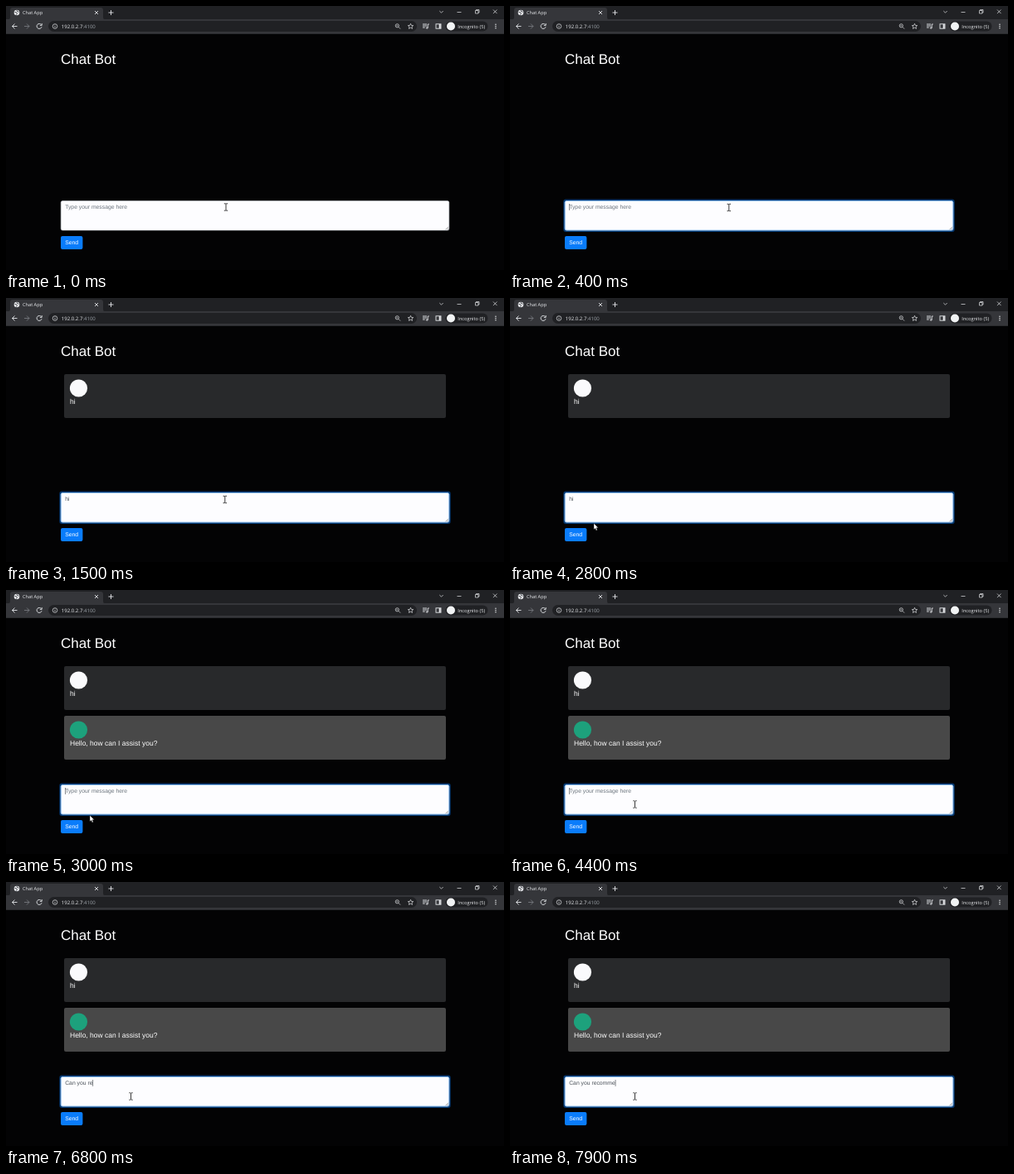
Recreate the animation shown at these times as an HTML page. Size 600x319 px, loop 8 s.

```html
<!DOCTYPE html>
<html lang="en">
<head>
<meta charset="utf-8">
<title>Chat App</title>
<style>
  html, body { margin: 0; width: 100%; height: 100%; overflow: hidden; background: #030304; }
  svg { display: block; width: 600px; height: 319px; }
  text { font-family: "Liberation Sans", Arial, sans-serif; text-rendering: geometricPrecision; white-space: pre; }
  .ui text { font-family: "Open Sans", "Noto Sans", sans-serif; fill: #e8eaed; }
  .icon { fill: none; stroke: #e4e6e9; stroke-width: .9; }
  .small { font-size: 6.8px; }
  .body { font-size: 8.5px; fill: #fff; }
</style>
</head>
<body>
<svg viewBox="0 0 600 319">
  <rect width="600" height="319" fill="#030304"/>

  <g class="ui">
    <rect width="600" height="17" fill="#202124"/>
    <path d="M2 16.5q3 0 3-3V5q0-3 3-3H114q3 0 3 3v8.500q0 3 3 3z" fill="#35363a"/>
    <rect y="16" width="600" height="17" fill="#35363a"/>
    <rect y="33" width="600" height=".6" fill="#47484b"/>
    <circle cx="13" cy="8" r="3.300" fill="#e8eaed"/>
    <path d="M10.500 7.200l2 .6 .8 1.600-1 1.300M13 5l.5 1.500 2 .7" fill="none" stroke="#35363a" stroke-width=".9"/>
    <text x="20" y="10.300" font-size="5.650">Chat App</text>
    <g class="icon">
      <path d="M107 6l4 4m0-4l-4 4M123.500 8h6m-3-3v6"/>
      <path d="M522.300 6l2.200 2.200L526.700 6" stroke-width=".7"/>
      <path d="M543.500 7.500h5M565.500 5.500h3.500v3.500h-3.500zM566.500 5.500v-1h3.500v3.500h-1M587 4.500l4.600 4.600m0-4.600l-4.600 4.600" stroke-width=".7"/>
      <path d="M13.500 24.500H7.500m3-3l-3 3 3 3"/>
      <path d="M22 24.500h6m-3-3l3 3-3 3" stroke="#77797d"/>
      <path d="M42.600 22.800a3 3 0 1 0 .4 2.400M43.200 21v2.400h-2.400"/>
    </g>
    <rect x="51" y="18" width="444" height="13" rx="6.500" fill="#202124"/>
    <g class="icon" stroke-width=".7">
      <circle cx="59" cy="24.500" r="2.800" stroke-width=".7"/>
      <path d="M59 24v2M59 22.700v.6" stroke-width=".7"/>
      <circle cx="471.300" cy="23.800" r="2.100" stroke-width=".7"/>
      <path d="M472.900 25.400l2.200 2.200M470.300 23.800h2" stroke-width=".7"/>
      <path d="M487.500 21.300l.9 2.100 2.300.2-1.700 1.500.5 2.300-2-1.200-2 1.200.5-2.300-1.700-1.500 2.300-.2z" stroke-width=".7"/>
      <path d="M502 22h5M502 24h5M502 26h2.800M508.200 26.500v-4.500h1.600"/>
      <circle cx="507.200" cy="26.500" r=".8"/>
      <rect x="518" y="21.800" width="6" height="5.400"/>
      <path d="M522.700 22v5" stroke-width="2"/>
    </g>
    <text x="66.800" y="26.800" font-size="6.050">192.0.2.7<tspan fill="#9aa0a6">:4100</tspan></text>
    <rect x="529.500" y="18.500" width="51" height="12" rx="6" fill="#202124"/>
    <circle cx="536" cy="24.500" r="5" fill="#f1f3f4"/>
    <text x="544.300" y="26.500" font-size="5.700">Incognito (5)</text>
    <g fill="#e8eaed">
      <circle cx="590" cy="22.300" r=".75"/><circle cx="590" cy="24.500" r=".75"/><circle cx="590" cy="26.700" r=".75"/>
    </g>
  </g>

  <text x="66" y="69.700" font-size="17" fill="#fff">Chat Bot</text>

  <g id="question">
    <rect x="70" y="92" width="460" height="53" rx="2" fill="#28292b"/>
    <circle cx="87.500" cy="109" r="10.600" fill="#fafafc"/>
    <text class="body" x="77" y="127.800">hi</text>
  </g>
  <g id="answer">
    <rect x="70" y="152" width="460" height="53" rx="2" fill="#484848"/>
    <circle cx="87.500" cy="169" r="10.600" fill="#1da17c"/>
    <text class="body" x="77" y="187.800">Hello, how can I assist you?</text>
  </g>

  <rect id="ring" x="64.300" y="233.600" width="471.400" height="39.300" rx="3" fill="#03376f"/>
  <rect x="66.200" y="235.500" width="467.600" height="35.500" rx="2" fill="#fdfdff" stroke="#ced4da" stroke-width=".6"/>
  <rect id="edge" x="66.200" y="235.500" width="467.600" height="35.500" rx="2" fill="none" stroke="#80bdff" stroke-width=".7"/>
  <path d="M529.500 270.300l3.500-3.500M531.500 270.300l1.500-1.500" stroke="#666" stroke-width=".6"/>
  <text id="hint" class="small" x="71.200" y="245.200" fill="#6c757d">Type your message here</text>
  <text id="typed" class="small" x="71.200" y="245.200" fill="#495057"></text>
  <rect id="caret" y="239" width=".6" height="7.800" fill="#33383d"/>

  <rect x="66" y="278" width="26.400" height="16" rx="2" fill="#0a7cfb"/>
  <text class="small" x="71.200" y="288.300" fill="#fff">Send</text>

  <path id="beam" d="M-2.200-4.200h1.500l.7.500 .7-.5h1.500M0-3.700v7.400M-2.200 4.200h1.500l.7-.5 .7.5h1.500" fill="none" stroke="#222" stroke-width=".9"/>
  <path id="arrow" d="M0 0v7.500l1.700-1.600 1.200 2.700 1.300-.6-1.200-2.600h2.300z" fill="#fff" stroke="#111" stroke-width=".4"/>
</svg>
<script>
  const LOOP = 8000, SENT = 1500, REPLIED = 3000, FOCUSED = 100;
  const el = id => document.getElementById(id);
  const show = (id, on) => el(id).setAttribute("visibility", on ? "visible" : "hidden");
  const clamp = x => Math.min(1, Math.max(0, x));

  // Field contents over time; each entry also restarts the caret blink.
  const edits = [[FOCUSED, ""], [700, "h"], [880, "hi"], [2000, "hi"], [REPLIED, ""]];
  const sentence = "Can you recomme";
  [5000, 5200, 5400, 5600, 5900, 6100, 6300, 6400, 6500, 6700, 6900, 7050, 7200, 7400, 7600]
    .forEach((time, i) => edits.push([time, sentence.slice(0, i + 1)]));

  // Pointer stops: time, x, y
  const stops = [[100, 265, 243], [400, 263.800, 243.500], [2350, 263.800, 243.500],
                 [2800, 101, 272.300], [3050, 101, 272.300], [3700, 150.500, 259]];

  function pointerAt(t) {
    const next = stops.findIndex(s => s[0] > t);
    if (next === 0) return stops[0].slice(1);
    if (next < 0) return stops[stops.length - 1].slice(1);
    const a = stops[next - 1], b = stops[next];
    const k = (t - a[0]) / (b[0] - a[0]), e = k * k * (3 - 2 * k);
    return [a[1] + (b[1] - a[1]) * e, a[2] + (b[2] - a[2]) * e];
  }

  function draw(now) {
    const t = now % LOOP;
    const focus = clamp((t - FOCUSED) / 150);
    el("ring").setAttribute("opacity", focus);
    el("edge").setAttribute("opacity", focus);
    show("question", t >= SENT);
    show("answer", t >= REPLIED);

    const [since, value] = edits.filter(e => e[0] <= t).pop() || [0, ""];
    const typed = el("typed");
    if (typed.textContent !== value) typed.textContent = value;
    show("hint", !value);
    show("caret", t >= FOCUSED && (t - since) % 1000 < 500);
    el("caret").setAttribute("x", 71.200 + (value ? typed.getComputedTextLength() : 0));

    const [x, y] = pointerAt(t);
    const inField = y < 271.500;
    show("beam", inField);
    show("arrow", !inField);
    for (const id of ["beam", "arrow"]) el(id).setAttribute("transform", `translate(${x} ${y})`);
  }

  let start;
  function tick(now) {
    start ??= now;
    draw(now - start);
    requestAnimationFrame(tick);
  }
  draw(0);
  requestAnimationFrame(tick);
</script>
</body>
</html>
```
